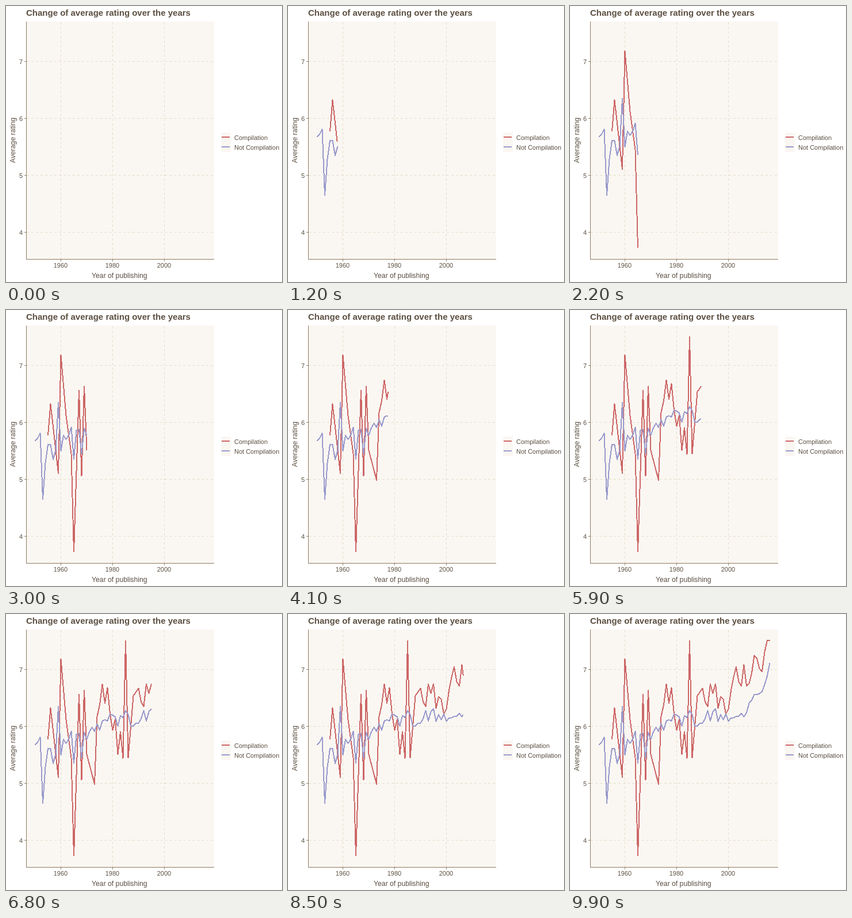
Animation of 480 by 480 pixels, one loop 10000 ms. Source, as an HTML page:

```html
<!DOCTYPE html>
<html lang="en">
<head>
<meta charset="utf-8">
<title>Change of average rating over the years</title>
<style>
  html, body { margin: 0; width: 100%; height: 100%; overflow: hidden; background: #fff; }
  svg { display: block; width: 480px; height: 480px; }
  text { font: 11px "Liberation Sans", Arial, sans-serif; fill: #5b4f41; }
  .title { font-size: 15px; font-weight: bold; }
  .name { font-size: 12.2px; text-anchor: middle; }
  .panel { fill: #faf7f2; }
  .grid { stroke: #e3ddcc; stroke-dasharray: 4 4; }
  .axis { stroke: #8d7a64; }
  .series { fill: none; stroke-width: 2; stroke-linejoin: round; }
  path, rect { shape-rendering: crispEdges; }
  .red { stroke: #cc6666; }
  .blue { stroke: #9999cc; }
</style>
</head>
<body>
<svg viewBox="0 0 480 480">
  <rect class="panel" x="36" y="27" width="326" height="413"/>
  <g id="scales"></g>
  <path id="compilation" class="series red"/>
  <path id="single" class="series blue"/>
  <path class="axis" fill="none" d="M35.5 27V440.5H362"/>
  <text class="title" x="35" y="17">Change of average rating over the years</text>
  <text class="name" x="197.3" y="473">Year of publishing</text>
  <text class="name" transform="translate(16 233.5) rotate(-90)">Average rating</text>
  <rect class="panel" x="374" y="220" width="17" height="34"/>
  <path class="series red" d="M375 228H389"/>
  <path class="series blue" d="M375 245H389"/>
  <text x="397" y="233">Compilation</text>
  <text x="397" y="250">Not Compilation</text>
</svg>
<script>
const LOOP = 10000, STEP = 100, FIRST = 1950;
const yearX = year => 50.5 + (year - FIRST) * 4.5;
const ratingY = rating => 96.5 + (7 - rating) * 99;

// Heights on the stage, one per year; 0 marks a year without data.
const compilation = [
  218, 163.5, 0, 0, 284, 78.5, 0, 184, 0, 250, 420.5, 0, 140, 288.5, 132.5,
  244, 0, 0, 296, 178, 158, 122, 155, 128.5, 174, 202, 183, 244, 205, 251,
  46.5, 250, 0, 142, 136, 129, 153, 161, 122, 138, 121.5, 164, 144, 148, 174,
  165, 133, 110, 92, 118, 125, 88.5, 125, 121, 103, 72, 77, 95, 100, 66, 46, 46];
const single = [
  228, 223, 214.5, 329, 266, 234, 234, 260, 244, 161,
  245, 218, 225, 218, 204, 259, 209, 208, 250, 206,
  218, 205, 197, 204, 191, 202, 186, 184, 186, 174,
  176, 179, 195, 177, 180, 168, 175, 195, 195, 190,
  190, 182, 168, 186, 170, 165, 187, 175, 184, 174,
  186.5, 181, 180.5, 178, 178, 173, 178.5, 172, 155, 150,
  140, 140, 138.5, 135, 123, 108, 85];

// Each year arrives on a whole step; halves round to even.
function arrival(year) {
  const step = (year - FIRST) * 1.5;
  return step % 1 ? 2 * Math.round(step / 2) : step;
}

const keyPoints = (heights, start) => heights
  .map((y, i) => ({ step: arrival(start + i), x: yearX(start + i), y }))
  .filter(point => point.y);

function reveal(points, step) {
  const shown = points.filter(point => point.step <= step);
  const last = shown[shown.length - 1], next = points[shown.length];
  if (last && next) {
    const k = (step - last.step) / (next.step - last.step);
    if (k > 0) shown.push({ x: last.x + (next.x - last.x) * k, y: last.y + (next.y - last.y) * k });
  }
  return shown.length > 1 ? "M" + shown.map(p => `${p.x.toFixed(2)} ${p.y.toFixed(2)}`).join("L") : "";
}

let scales = "";
for (const rating of [4, 5, 6, 7]) {
  const y = ratingY(rating);
  scales += `<path class="grid" d="M36 ${y}H362"/><path class="axis" d="M32 ${y}H35"/>
    <text x="29" y="${y + 4.5}" text-anchor="end">${rating}</text>`;
}
for (const year of [1960, 1980, 2000]) {
  const x = yearX(year);
  scales += `<path class="grid" d="M${x} 440V27"/><path class="axis" d="M${x} 441V444"/>
    <text x="${x - .5}" y="455" text-anchor="middle">${year}</text>`;
}
document.getElementById("scales").innerHTML = scales;

const series = [
  [document.getElementById("compilation"), keyPoints(compilation, 1955)],
  [document.getElementById("single"), keyPoints(single, FIRST)]];

function draw(time) {
  const step = Math.floor(time % LOOP / STEP);
  for (const [path, points] of series) path.setAttribute("d", reveal(points, step));
}

const began = performance.now();
function tick() {
  draw(performance.now() - began);
  requestAnimationFrame(tick);
}
tick();
</script>
</body>
</html>
```
